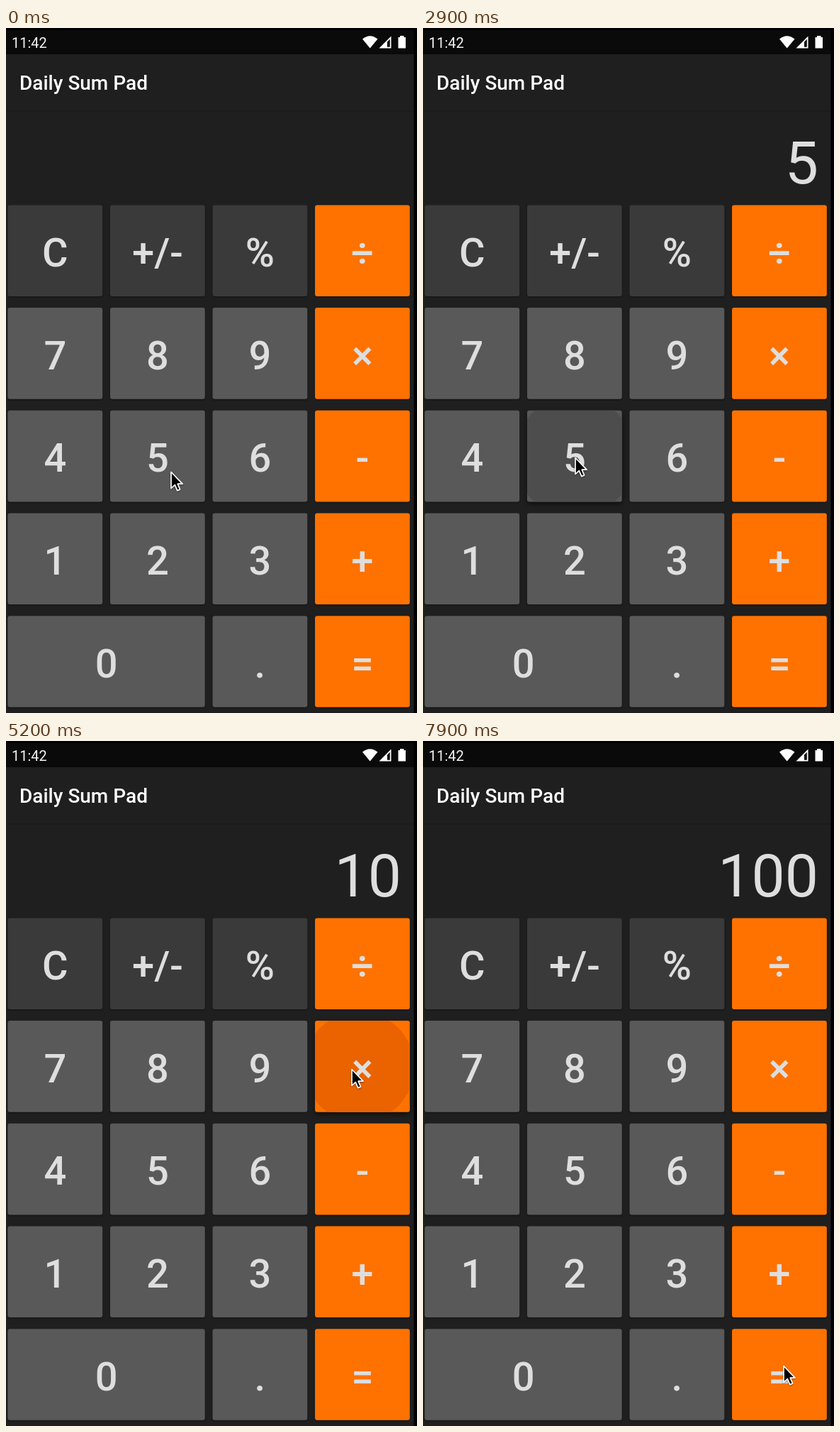
These frames come from a looping animation (580x965 px, 8000 ms). An HTML page:

```html
<!DOCTYPE html>
<html lang="en">
<head>
<meta charset="utf-8">
<title>Calculator</title>
<style>
  html, body { margin: 0; width: 100%; height: 100%; overflow: hidden; background: #1f1f1f; }
  svg { display: block; width: 580px; height: 965px; font-family: Roboto, sans-serif; }
  .key rect { filter: drop-shadow(0 1px 1px rgba(0, 0, 0, .4)); }
  .key.down rect { filter: drop-shadow(0 3px 3px rgba(0, 0, 0, .55)); }
  .label { font-size: 56px; font-weight: 500; fill: #dedede; text-anchor: middle; }
  #display { font-size: 84px; fill: #dedede; text-anchor: end; }
</style>
</head>
<body>
<svg viewBox="0 0 580 965">
  <clipPath id="clip"><rect id="clipBox" rx="3"/></clipPath>
  <rect width="580" height="965" fill="#1f1f1f"/>
  <rect y="116" width="580" height="2" fill="#1b1b1b"/>
  <rect width="580" height="37" fill="#0a0a0a"/>
  <rect width="580" height="3" fill="#000"/>
  <rect x="575.5" width="4.5" height="965" fill="#000"/>

  <text x="8" y="28" font-size="20" fill="#f5f5f5">11:42</text>
  <g fill="#fff">
    <path d="M503 15.5Q513.5 7 524.5 15.5L513.7 28.5Z"/>
    <path d="M526.5 28.5L543.5 11.5V28.5ZM538 26.8H541.8V15.8L538 19.6Z" fill-rule="evenodd"/>
    <path d="M553.5 13H556V11H561.5V13H564V28.5H553.5Z"/>
  </g>
  <text x="19" y="87" font-size="28" font-weight="500" fill="#fff">Daily Sum Pad</text>
  <text id="display" x="558" y="218.5"></text>

  <g id="keys"></g>
  <g clip-path="url(#clip)"><circle id="ripple"/></g>
  <g id="labels"></g>

  <g id="cursor" style="filter: drop-shadow(0 1px 1px rgba(0, 0, 0, .4))">
    <path d="M1 1.5V24.5L6.3 19.6L9.8 27.6L13.6 26L10.2 18.2H17Z"
          fill="#000" stroke="#fff" stroke-width="1.7" stroke-linejoin="round"/>
  </g>
</svg>
<script>
const $ = id => document.getElementById(id);
const LOOP = 8000, STEP = 100;

function add(parent, tag, attrs) {
  const el = document.createElementNS('http://www.w3.org/2000/svg', tag);
  set(el, attrs);
  parent.append(el);
  return el;
}
function set(el, attrs) {
  for (const name in attrs) el.setAttribute(name, attrs[name]);
}

// Keypad: a blank entry widens the key on its left.
const rows = [
  ['C', '+/-', '%', '÷'],
  ['7', '8', '9', '×'],
  ['4', '5', '6', '-'],
  ['1', '2', '3', '+'],
  ['0', '', '.', '=']
];
const keys = {};
rows.forEach((row, r) => row.forEach((name, c) => {
  if (!name) return;
  const x = 2.4 + c * 144.55, y = 249.4 + r * 144.7;
  const w = row[c + 1] === '' ? 278.3 : 133.8, h = 128.6;
  const fill = c === 3 ? '#ff7200' : r ? '#595959' : '#3a3a3a';
  const g = add($('keys'), 'g', { class: 'key' });
  add(g, 'rect', { x, y, width: w, height: h, rx: 3, fill });
  add($('labels'), 'text', { x: x + w / 2, y: y + 86.6, class: 'label' }).textContent = name;
  keys[name] = { x, y, w, h, g, tint: c === 3 ? '#eb6200' : '#4c4c4c' };
}));

// [key, press, release, display after release]
const taps = [
  ['5', 380, 490, '5'],
  ['+', 2095, 2280, ''],
  ['5', 2760, 2880, '5'],
  ['=', 3480, 3590, '10'],
  ['×', 5095, 5330, ''],
  ['1', 6350, 6460, '1'],
  ['0', 6760, 6880, '10'],
  ['=', 7510, 7680, '100']
];

// [time, x, y, linear]
const path = [
  [0, 232, 624], [950, 232, 624], [1900, 478, 745], [2300, 478, 745],
  [2700, 214, 604], [2950, 214, 604], [3450, 487, 888], [3700, 487, 888],
  [4100, 483, 714, 1], [4500, 486, 499, 1], [4900, 487, 461], [5450, 487, 461],
  [6250, 57, 757], [6500, 57, 757], [6750, 159, 910], [6950, 159, 910],
  [7300, 505, 885], [7500, 508, 879], [LOOP, 508, 879]
];

const clamp = v => Math.min(1, Math.max(0, v));
const mix = (a, b, u) => a + (b - a) * u;

function pointer(t) {
  const i = path.findIndex(p => p[0] > t);
  const a = path[i - 1], b = path[i];
  let u = (t - a[0]) / (b[0] - a[0]);
  if (!b[3]) u = u * u * (3 - 2 * u);
  return [mix(a[1], b[1], u), mix(a[2], b[2], u)];
}

function drawRipple(t) {
  const tap = taps.find(([, press, release]) => t >= press && t < release + 150);
  $('ripple').style.opacity = 0;
  for (const name in keys) keys[name].g.classList.remove('down');
  if (!tap) return;
  const [name, press, release] = tap;
  const { x, y, w, h, g, tint } = keys[name];
  const [px, py] = pointer(press);
  const u = 1 - (1 - clamp((t - press) / 225)) ** 2;
  set($('clipBox'), { x, y, width: w, height: h });
  set($('ripple'), {
    cx: mix(px, x + w / 2, u),
    cy: mix(py, y + h / 2, u),
    r: mix(Math.max(w, h) * .3, Math.hypot(w, h) / 2, u),
    fill: tint
  });
  $('ripple').style.opacity = clamp((t - press) / 75) * (1 - clamp((t - release) / 150));
  g.classList.add('down');
}

const start = performance.now();
function draw() {
  const elapsed = (performance.now() - start) % LOOP;
  const t = Math.floor(elapsed / STEP) * STEP;
  const done = taps.filter(tap => tap[2] <= t).pop();
  $('display').textContent = done ? done[3] : '';
  drawRipple(t);
  set($('cursor'), { transform: `translate(${pointer(t)})` });
  requestAnimationFrame(draw);
}
draw();
</script>
</body>
</html>
```
